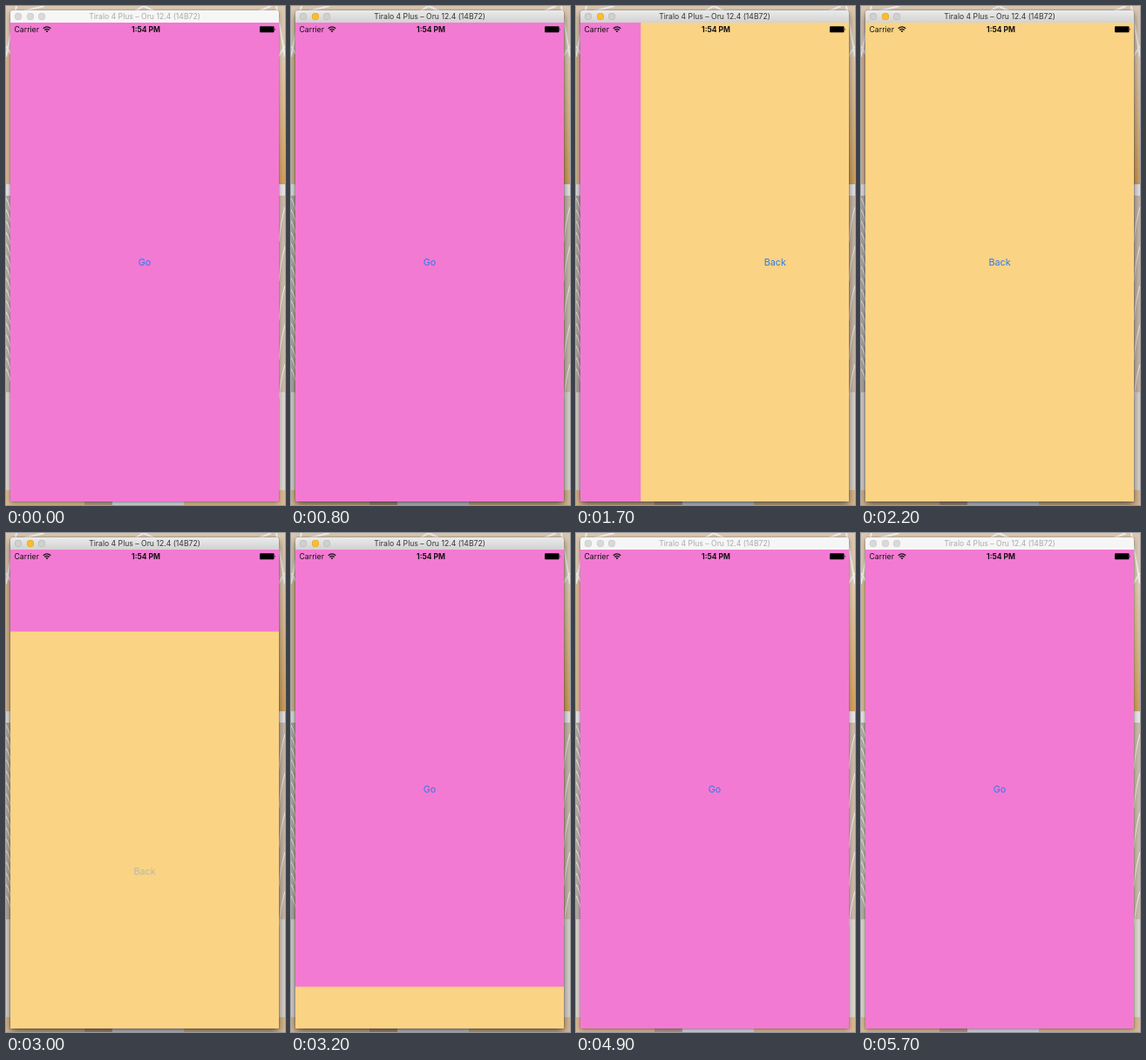
Write an HTML page that moves like this. It is 320 px wide and 571 px high and loops after 5800 ms.

```html
<!DOCTYPE html>
<html lang="en">
<head>
<meta charset="utf-8">
<title>Screen transition</title>
<style>
  html, body { margin: 0; width: 100%; height: 100%; overflow: hidden; }
  body { position: relative; font-family: Inter, sans-serif; }
  svg, .window, .bar, .screen, .page, .page span, .title, .time, .carrier, .light { position: absolute; }
  .wallpaper { left: 0; top: 0; }
  .window { left: 5px; top: 5px; width: 308px; height: 562px; border-radius: 3px 3px 0 0;
    box-shadow: 0 0 0 .5px #0003, 0 2px 6px #0005; }
  .active { box-shadow: 0 0 0 .5px #0004, 0 4px 10px #0008; }
  .bar { width: 308px; height: 14px; border-radius: 3px 3px 0 0; background: #f6f6f6; color: #aaa; }
  .active .bar { background: linear-gradient(#ebebeb, #d2d2d2); color: #333; }
  .title { width: 100%; text-align: center; font-size: 8.65px; line-height: 14px; white-space: nowrap; }
  .light { top: 3px; width: 8px; height: 8px; border-radius: 50%; background: #d9d9d9;
    box-shadow: inset 0 0 0 .5px #c6c6c6; }
  .active .light { background: #d0d0d0; box-shadow: inset 0 0 0 .5px #b4b4b4; }
  .active .minimize { background: #fbbd2e; box-shadow: inset 0 0 0 .5px #dfa023; }
  .screen { top: 14px; width: 308px; height: 548px; overflow: hidden; }
  .page { width: 308px; height: 548px; color: #2a7bf0; font-size: 10.8px; }
  .page span { top: 268px; width: 100%; line-height: 14px; text-align: center; }
  .pink { background: #f37ad2; }
  .yellow { background: #fad384; }
  .carrier, .time { top: 2px; line-height: 12px; font-size: 8.7px; color: #111; white-space: nowrap; }
  .carrier { left: 4.5px; }
  .time { left: 1.5px; width: 308px; text-align: center; font-size: 8.5px; font-weight: 700; }
  .icons { left: 0; top: 0; }
</style>
</head>
<body>
<svg class="wallpaper" width="320" height="571">
  <linearGradient id="wood" x2="0" y2="1">
    <stop stop-color="#e2cdb4"/>
    <stop offset="1" stop-color="#d0a05c"/>
  </linearGradient>
  <path fill="#dcc8b0" d="M0 0h320v571H0z"/>
  <path fill="#d8b792" d="M0 55h10v149H0z"/>
  <path fill="url(#wood)" d="M308 50h12v154h-12z"/>
  <path fill="#e6e4e6" d="M0 204h320v13H0z"/>
  <path fill="#b5aea4" d="M0 217h10v225H0z"/>
  <path fill="#cbb9a8" d="M308 217h12v225h-12z"/>
  <path fill="#dcd5cd" d="M0 442h320v112H0z"/>
  <path fill="#d9b891" d="M0 554h320v17H0z"/>
  <path fill="#b39a86" d="M90 560h32v11H90z"/>
  <path fill="#d8d9e4" d="M122 560h82v11h-82z"/>
  <g fill="none" stroke="#f2efec" stroke-width="2">
    <path d="M12 0L0 58M0 46l9 14M20 6L44 0M148 6l10-6 12 6M290 6l14-6M310 0l10 58M320 46l-9 14"/>
    <path id="strands" stroke-width="1"/>
  </g>
</svg>
<div class="window" id="win">
  <div class="bar">
    <i class="light" style="left:5px"></i>
    <i class="light minimize" style="left:18.5px"></i>
    <i class="light" style="left:32px"></i>
    <div class="title">Tiralo 4 Plus – Oru 12.4 (14B72)</div>
  </div>
  <div class="screen">
    <div class="page pink"><span id="go">Go</span></div>
    <div class="page yellow" id="sheet"><span id="back">Back</span></div>
    <div class="carrier">Carrier</div>
    <div class="time">1:54 PM</div>
    <svg class="icons" width="308" height="16">
      <g fill="none" stroke="#111" stroke-width="1.3">
        <path d="M37.7 6.8q4.3-3.8 8.6 0M39.3 8.5q2.7-2.3 5.4 0"/>
      </g>
      <path fill="#111" d="M40.5 9.6q1.5-1.1 3 0L42 11.2zM303.2 6.5q1.4 1.3 0 2.6z"/>
      <rect x="286" y="4.3" width="16.5" height="7" rx="1" fill="#000"/>
    </svg>
  </div>
</div>
<script>
const LOOP = 5800, STEP = 100, SLIDE = 372;
const ENTER = 1445, LEAVE = 2899;
const $ = id => document.getElementById(id);
const win = $('win'), sheet = $('sheet'), go = $('go'), back = $('back');

// Fine wallpaper strands, dense on the left and sparse on the right.
let strands = '';
for (let y = 220; y < 420; y += 13) strands += `M0 ${y}q5 8 7 24`;
for (let y = 230; y < 420; y += 45) strands += `M313 ${y + 40}q2-24 7-40`;
$('strands').setAttribute('d', strands);

const progress = (t, start, length) => Math.min(1, Math.max(0, (t - start) / length));
const ease = p => (1 - Math.cos(Math.PI * p)) / 2;

// A pressed label dims at once, then recovers after release.
const pressed = (t, down, up) => t < down ? 1 : .3 + .7 * progress(t, up, 300);

function draw(now) {
  const t = Math.floor(now % LOOP / STEP) * STEP;
  win.classList.toggle('active', t >= 500 && t < 4700);

  const x = 308 * (1 - ease(progress(t, ENTER, SLIDE)));
  const y = 548 * ease(progress(t, LEAVE, SLIDE));
  sheet.style.transform = `translate(${x}px, ${y}px)`;

  go.style.opacity = pressed(t, 1350, 1450);
  back.style.opacity = pressed(t, 2800, 3000);
  requestAnimationFrame(draw);
}
requestAnimationFrame(draw);
</script>
</body>
</html>
```
